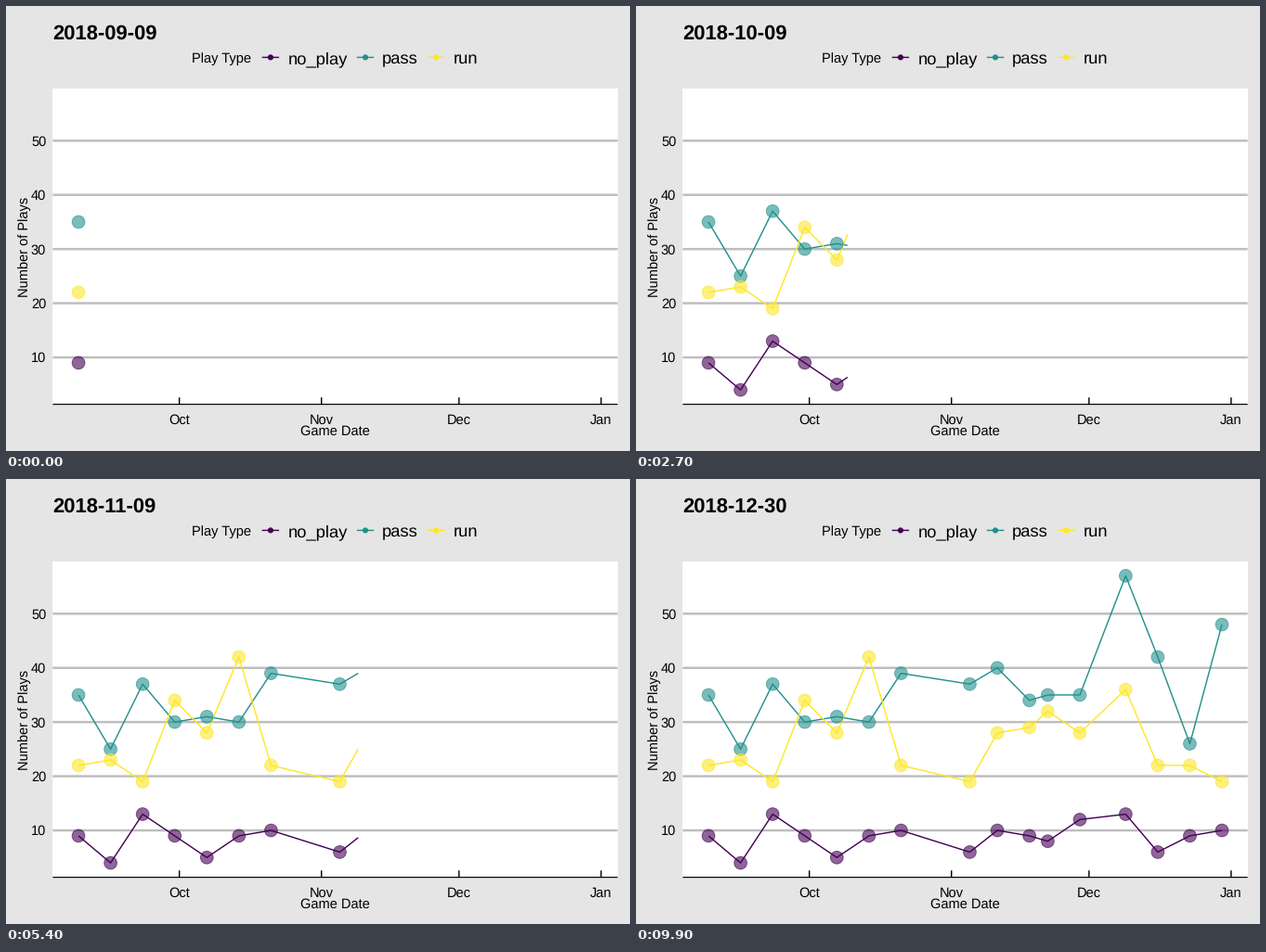
Write a matplotlib script that moves like this. It is 672x480 px and loops after 10 s.

```python
import numpy as np
import matplotlib.pyplot as plt
from matplotlib.animation import FuncAnimation
from matplotlib.patches import Circle, Rectangle

plt.rcParams.update({
    "font.family": "Liberation Sans",
    "text.hinting": "none",
    "lines.solid_capstyle": "butt",
    "lines.solid_joinstyle": "round",
})

W, H, DPI = 672, 480, 96
FRAMES, INTERVAL = 100, 100
PX = 72 / DPI  # points per pixel

START = np.datetime64("2018-09-09")
DAYS = np.array([0, 7, 14, 21, 28, 35, 42, 57, 63, 70, 74, 81, 91, 98, 105, 112])
SPAN = int(DAYS[-1])
PLAYS = {
    "no_play": ("#440154", [9, 4, 13, 9, 5, 9, 10, 6, 10, 9, 8, 12, 13, 6, 9, 10]),
    "pass": ("#21908C", [35, 25, 37, 30, 31, 30, 39, 37, 40, 34, 35, 35, 57, 42, 26, 48]),
    "run": ("#FDE725", [22, 23, 19, 34, 28, 42, 22, 19, 28, 29, 32, 28, 36, 22, 22, 19]),
}
LEGEND_X = {"no_play": (284.9, 303.6), "pass": (387, 405.2), "run": (463.4, 481.3)}

LEFT, RIGHT, TOP, BOTTOM = 50.4, 658.67, 88.9, 429.6

# Each game lands on a whole frame; the line moves evenly between them.
KEYS = np.rint(DAYS / SPAN * (FRAMES - 1)).astype(int)


def to_x(day):
    return LEFT + (np.asarray(day) + 0.05 * SPAN) / (1.1 * SPAN) * (RIGHT - LEFT)


def to_y(count):
    return BOTTOM - (np.asarray(count) - 1.35) / 58.3 * (BOTTOM - TOP)


fig = plt.figure(figsize=(W / DPI, H / DPI), dpi=DPI, facecolor="#E5E5E5")
ax = fig.add_axes([0, 0, 1, 1])
ax.set(xlim=(0, W), ylim=(H, 0))
ax.axis("off")


def stroke(x, y, color, width, z=2):
    line, = ax.plot(x, y, color=color, lw=width * PX, zorder=z, snap=False)
    return line


def label(x, y, text, size=11, **kw):
    return ax.text(x, y, text, fontsize=size, color="black", va="baseline", **kw)


def dot(x, y, radius, color, alpha=1):
    return ax.add_patch(Circle((x, y), radius, fc=color, ec=color, lw=0.945 * PX,
                               alpha=alpha, zorder=5))


# Panel, grid and axes
ax.add_patch(Rectangle((LEFT, TOP), RIGHT - LEFT, BOTTOM - TOP, fc="white", lw=0, zorder=0))
for count in range(10, 60, 10):
    y = to_y(count)
    stroke([LEFT, RIGHT], [y, y], "#BEBEBE", 2.49, 1)
    label(43.2, y + 5.3, str(count), ha="right")

stroke([LEFT, RIGHT], [BOTTOM, BOTTOM], "black", 1.2, 6)
for day, month in [(22, "Oct"), (53, "Nov"), (83, "Dec"), (114, "Jan")]:
    x = to_x(day)
    stroke([x, x], [BOTTOM, BOTTOM - 7.33], "black", 1.42, 6)
    label(x, 451.2, month, ha="center")

label((LEFT + RIGHT) / 2, 463.2, "Game Date", ha="center")
label(25, (TOP + BOTTOM) / 2 + 0.5, "Number of Plays", rotation=90,
      ha="right", rotation_mode="default").set(va="center", ha="center", x=20.3)

# Legend
label(200.4, 61, "Play Type")
for name, (key_x, text_x) in LEGEND_X.items():
    color = PLAYS[name][0]
    stroke([key_x - 9.2, key_x + 9.2], [55.4, 55.4], color, 1.42)
    dot(key_x, 55.4, 2.6, color)
    label(text_x, 62, name, 13.75)

title = label(50.4, 35.3, "", 16.5, weight="bold")

lines = {name: stroke([], [], color, 1.42, 4) for name, (color, _) in PLAYS.items()}
dots = [
    [dot(to_x(day), to_y(counts[k]), 6.87, color, 0.6) for color, counts in PLAYS.values()]
    for k, day in enumerate(DAYS)
]


def update(i):
    title.set_text(str(START + np.timedelta64(SPAN * i // (FRAMES - 1), "D")))
    seen = KEYS <= i
    tip_day = np.interp(i, KEYS, DAYS)
    xs = to_x(np.append(DAYS[seen], tip_day))
    for name, (_, counts) in PLAYS.items():
        counts = np.array(counts)
        tip = np.interp(i, KEYS, counts)
        lines[name].set_data(xs, to_y(np.append(counts[seen], tip)))
    for shown, group in zip(seen, dots):
        for d in group:
            d.set_visible(bool(shown))
    return [title, *lines.values()]


anim = FuncAnimation(fig, update, frames=FRAMES, interval=INTERVAL,
                     repeat=True, repeat_delay=0, blit=False)
plt.show()
```
